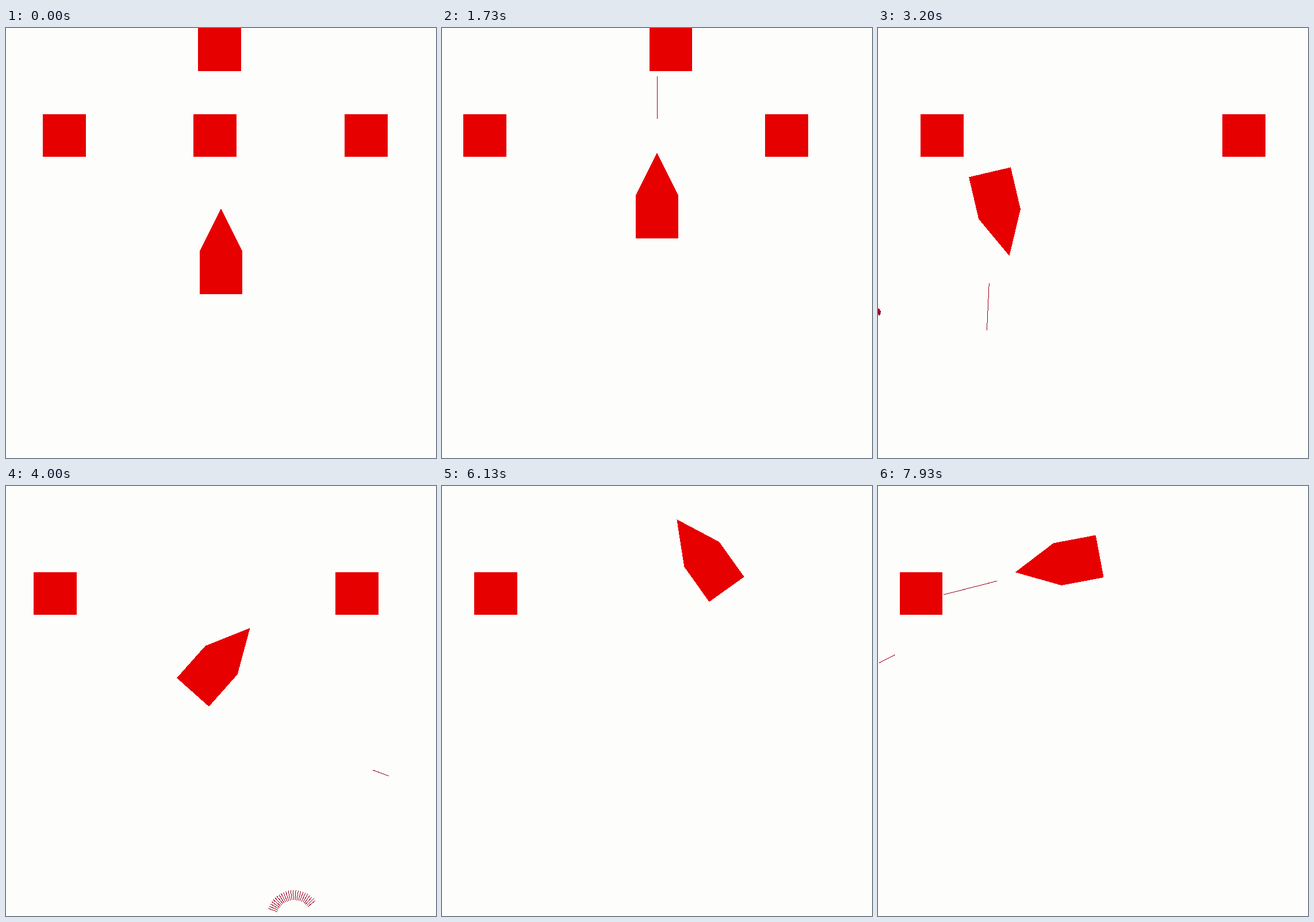
These frames come from a looping animation (748 by 748 pixels, 8 s). An HTML page:

```html
<!DOCTYPE html>
<html lang="en">
<head>
<meta charset="utf-8">
<title>Ship and squares</title>
<style>
  html, body { margin: 0; width: 100%; height: 100%; overflow: hidden; background: #fdfdfc; }
  svg { display: block; width: 100vw; height: 100vh; }
</style>
</head>
<body>
<svg viewBox="0 0 748 748" shape-rendering="crispEdges">
  <path id="lines" fill="none" stroke="#980020" stroke-width="1"/>
  <path id="squares" fill="#e60000"/>
  <path id="ship" fill="#e60000" d="M0-108.8L37.4-34V40.8H-37.4V-34Z"/>
</svg>
<script>
// Times are in ticks, headings in degrees clockwise from up
const STAGE = 748, UNIT = 74.8, LOOP = 8000, TICK = 1000 / 15, TICKS = 120;
const DRIVE = 15.7, TURN = 10.43, NOSE = 108.8, STEP = .1;
const BULLET = 45, RAYS = 24, BURST = 2;
const rad = d => d * Math.PI / 180;
const el = id => document.getElementById(id);

// Held controls: from, to, direction
const drive = [[0, 7.65, -1], [12.17, 61.87, 1], [77.7, 101.05, 1]];
const turn = [
  [29.48, 60, -1], [63, 64, 1], [66, 66.36, 1], [70, 70.83, 1],
  [82.41, 100.29, -1], [112, 112.44, 1], [117, 118.6, 1]
];
// Rounds of fire: first shot, count, interval
const rounds = [[18, 2, 6], [33.27, 2, 3.1], [43.02, 4, 3.46], [65.4, 3, 4], [94.5, 6, 4.75]];

// dir tells which way a square sways, end is when it is destroyed
const squares = [
  { x: 0, y: 2 * UNIT, dir: 1, end: Infinity },
  { x: 262.5, y: 2 * UNIT, dir: 1, end: 19 },
  { x: 525, y: 2 * UNIT, dir: 1, end: 76.5 },
  { x: 398, y: 0, dir: -1, end: 26.5 }
];

const held = (spans, a, b) => spans.reduce(
  (sum, [from, to, dir]) => sum + dir * Math.max(0, Math.min(b, to) - Math.max(a, from)), 0);

// Point at distance d from (x, y) along heading a
const ahead = (x, y, a, d) => [x + d * Math.sin(rad(a)), y - d * Math.cos(rad(a))];

function steer() {
  const path = [{ x: 374, y: 422.6, a: 0 }];
  for (let i = 0; i <= TICKS / STEP; i++) {
    const { x, y, a } = path[i], t = i * STEP;
    const da = TURN * held(turn, t, t + STEP);
    const [nx, ny] = ahead(x, y, a + da / 2, DRIVE * held(drive, t, t + STEP));
    path.push({ x: nx, y: ny, a: a + da });
  }
  return path;
}
const path = steer();

function shipAt(t) {
  const i = Math.floor(t / STEP), u = t / STEP - i, p = path[i], q = path[i + 1];
  const mix = k => p[k] + (q[k] - p[k]) * u;
  return { x: mix("x"), y: mix("y"), a: mix("a") };
}

function squareX(s, t) {
  const phase = .203 * (t - 9);
  return s.x + s.dir * (77 + 43.5 * Math.cos(phase) - 3 * Math.cos(3 * phase));
}

function wallDistance(x, y, a) {
  const [dx, dy] = ahead(0, 0, a, 1);
  const reach = (p, d) => d > 0 ? (STAGE - p) / d : d < 0 ? -p / d : Infinity;
  return Math.min(reach(x, dx), reach(y, dy)) + 4;
}

// Bullets start long and shrink in flight
const bulletHead = tail => tail + Math.max(30, 110 - .4 * tail);

function makeShot(fired) {
  const { x, y, a } = shipAt(fired), [tx, ty] = ahead(x, y, a, NOSE);
  const wall = wallDistance(tx, ty, a);
  let dist = wall;
  let hit = fired + Math.max(0, Math.min(wall - 30, (wall - 110) / .6)) / BULLET;
  for (const s of squares) {
    if (s.end <= fired || s.end >= hit) continue;
    const d = bulletHead((s.end - fired) * BULLET), [hx, hy] = ahead(tx, ty, a, d);
    const inX = hx - squareX(s, s.end), inY = hy - s.y;
    if (inX >= 0 && inX <= UNIT && inY >= 0 && inY <= UNIT) [hit, dist] = [s.end, d];
  }
  return { fired, hit, dist, a, x: tx, y: ty };
}
const shots = rounds.flatMap(([first, count, gap]) =>
  Array.from({ length: count }, (_, i) => makeShot(first + i * gap)));

function segment(x, y, a, from, to) {
  const point = d => ahead(x, y, a, d).map(n => n.toFixed(1)).join(" ");
  return `M${point(from)}L${point(to)}`;
}

// Rays spread towards the top centre; far hits spread less
function burst(x, y, age, dist) {
  const u = age / BURST, outer = 50 * (1 - (1 - u) ** 2), inner = 50 * Math.max(0, 2 * u - 1);
  const fan = Math.min(360, 51500 / dist), mid = Math.atan2(STAGE / 2 - x, y) * 180 / Math.PI;
  let d = "";
  for (let i = 0; i < RAYS; i++) {
    d += segment(x, y, mid + fan * ((i + .5) / RAYS - .5), inner, outer);
  }
  return d;
}

function shotPath(t, { fired, hit, dist, a, x, y }) {
  if (t < fired || t >= hit + BURST) return "";
  if (t >= hit) return burst(...ahead(x, y, a, dist), t - hit, dist);
  const tail = (t - fired) * BULLET;
  return segment(x, y, a, tail, bulletHead(tail));
}

function draw(t) {
  const { x, y, a } = shipAt(t);
  el("lines").setAttribute("d", shots.map(s => shotPath(t, s)).join(""));
  el("squares").setAttribute("d", squares.filter(s => t < s.end)
    .map(s => `M${squareX(s, t).toFixed(1)} ${s.y}h${UNIT}v${UNIT}h${-UNIT}z`).join(""));
  el("ship").setAttribute("transform", `translate(${x} ${y}) rotate(${a})`);
}

const start = performance.now();
function frame() {
  const ms = (performance.now() - start) % LOOP;
  draw(Math.min(TICKS - 1, Math.floor((ms + 3.4) / TICK)));
  requestAnimationFrame(frame);
}
frame();
</script>
</body>
</html>
```
